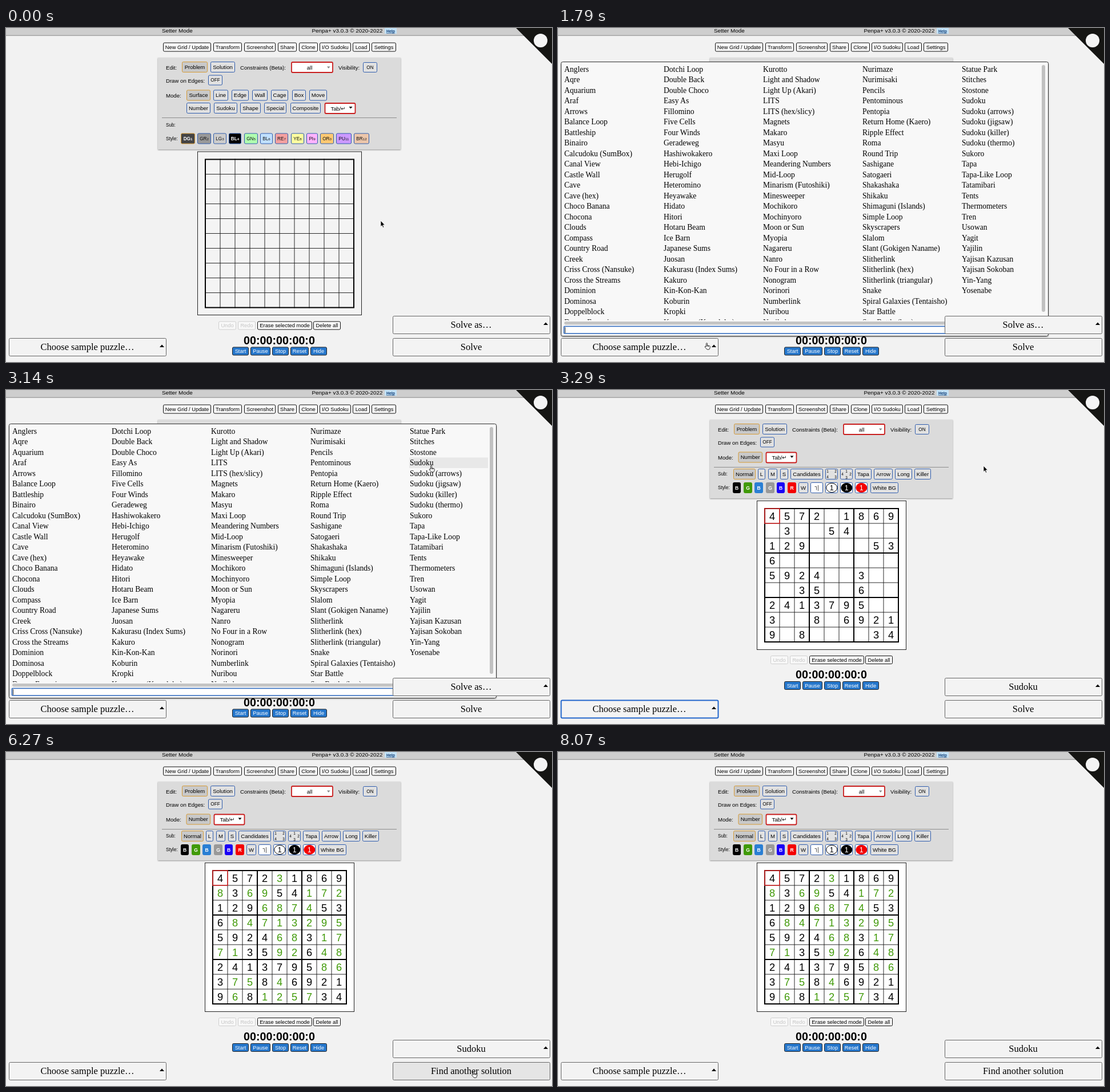
Animation of 956 by 586 pixels, one loop 8.22 s. Source, as an HTML page:

```html
<!DOCTYPE html>
<html lang="en">
<head>
<meta charset="utf-8">
<title>Puzzle solver demo</title>
<style>
html, body { margin: 0; width: 100%; height: 100%; overflow: hidden; background: #f2f2f2; }
svg { display: block; font: 9.6px "Liberation Sans", Arial, "DejaVu Sans", sans-serif; }
.serif { font-family: "Liberation Serif", "Times New Roman", serif; }
.shadow { filter: drop-shadow(0 1px 1px #0006); }
</style>
</head>
<body>
<svg id="stage" width="956" height="586" viewBox="0 0 956 586"></svg>
<script>
const BLUE = '#2f5cad', ORANGE = '#d59a35', RED = '#c81e1e';

const text = (x, y, s, attrs = '') => `<text x="${x}" y="${y}" ${attrs}>${s}</text>`;
const mid = (x, y, s, attrs = '') => text(x, y, s, 'text-anchor="middle" ' + attrs);
const path = (d, attrs = '') => `<path d="${d}" ${attrs}/>`;
const fillRect = (x, y, w, h, fill, attrs = '') =>
  `<rect x="${x}" y="${y}" width="${w}" height="${h}" fill="${fill}" ${attrs}/>`;
// Outlined box whose one-pixel border lies inside x1..x2, y1..y2
const box = (x1, y1, x2, y2, fill, stroke, attrs = 'rx="2"') =>
  fillRect(x1 + .5, y1 + .5, x2 - x1 - 1, y2 - y1 - 1, fill, `stroke="${stroke}" ${attrs}`);
const group = (content, attrs = '') => `<g ${attrs}>${content}</g>`;

function button(x1, x2, y, label, { h = 19, fill = '#e1e1e1', stroke = BLUE, color = '#000', size = 9.6, attrs = '' } = {}) {
  return box(x1, y, x2, y + h, fill, stroke) +
    mid((x1 + x2) / 2, y + h / 2 + size * .36, label, `font-size="${size}" fill="${color}" ${attrs}`);
}
// items: [left, right, label, options]
const row = (y, items, common = {}) =>
  items.map(([a, b, s, o]) => button(a, b, y, s, { ...common, ...o })).join('');
const picked = { fill: '#c9c9c9', stroke: ORANGE };

const redSelect = (x1, x2, y, label, labelX, arrow, arrowColor) =>
  fillRect(x1 + 1, y + 1, x2 - x1 - 2, 18, '#fff', `rx="2" stroke="${RED}" stroke-width="1.8"`) +
  mid(labelX, y + 13.8, label) + path(arrow, `fill="${arrowColor}"`);
const tabSelect = (x, y) =>
  redSelect(x, x + 55, y, 'Tab/↵', x + 24, `M${x + 43} ${y + 7}h6l-3 3.4z`, '#000');

function header() {
  return fillRect(0, 0, 956, 12.5, '#cecece') + fillRect(0, 12.5, 956, 1.2, '#8e8e8e') +
    text(273, 8.3, 'Setter Mode', 'font-size="9.9"') +
    text(535.5, 8.3, 'Penpa+ v3.0.3 © 2020-2022', 'font-size="9.9"') +
    fillRect(663, 0, 21, 10, '#c3e2f7') +
    mid(673.5, 7.8, 'Help', 'font-size="7" font-weight="bold" fill="#123f78" text-decoration="underline"') +
    row(25.5, [[275, 359, 'New Grid / Update'], [363, 413, 'Transform'], [417, 472, 'Screenshot'],
      [476, 509, 'Share'], [513, 546, 'Clone'], [549, 604, 'I/O Sudoku'], [607, 637, 'Load'],
      [640, 683, 'Settings']], { h: 16, fill: '#f8f8f8', stroke: '#111', size: 9.3 }) +
    path('M893 0H956V63z', 'fill="#151513"') + '<circle cx="936" cy="22" r="12" fill="#f4f4f4"/>';
}

function panel(bottom, divider) {
  return fillRect(266, 52, 425, bottom - 52, '#dbdbdb', 'class="shadow"') +
    text(280, 72.5, 'Edit:') + text(410, 72.5, 'Constraints (Beta):') + text(582, 72.5, 'Visibility:') +
    text(280, 95.5, 'Draw on Edges:') + text(280, 121.5, 'Mode:') +
    row(59, [[308, 353, 'Problem', picked], [358, 401, 'Solution']]) +
    button(625, 650, 60, 'ON', { size: 8.2, h: 18 }) + button(354, 379, 82.5, 'OFF', { size: 8.2, h: 18 }) +
    redSelect(499, 573, 59, 'all', 531.5, 'M562 67.5h5.6l-2.8 3.4z', '#888') +
    fillRect(273, divider, 411, 1, '#8c8c8c');
}

function footer(dy) {
  const small = { h: 15, fill: '#f8f8f8', stroke: '#111', size: 9.3 };
  const off = { stroke: '#cfcfcf', color: '#c6c6c6' };
  return group(
    row(514.5, [[372, 403, 'Undo', off], [406, 437, 'Redo', off], [440, 536, 'Erase selected mode'],
      [538, 586, 'Delete all']], small) +
    mid(478.5, 554.5, '00:00:00:00:0', 'font-size="19.7" font-weight="bold"') +
    row(559.5, [[396, 425, 'Start'], [428, 463, 'Pause'], [466, 495, 'Stop'], [498, 530, 'Reset'],
      [533, 562, 'Hide']], { ...small, fill: '#2677cc', stroke: '#222', color: '#fff' }),
    `transform="translate(0 ${dy})"`);
}

// Square grid of 26-pixel cells; every line divisible by `block` is heavy
function grid(x, y, n, block) {
  let thin = '', thick = '';
  for (let i = 0; i <= n; i++) {
    const d = `M${x + 26 * i} ${y - 1}v${26 * n + 2}M${x - 1} ${y + 26 * i}h${26 * n + 2}`;
    if (i % block) thin += d; else thick += d;
  }
  return path(thin, 'stroke="#111" stroke-width=".9"') + path(thick, 'stroke="#000" stroke-width="2"');
}

function startPage() {
  const swatches = [[306, 331, 'DG', 1, '#444'], [335, 359, 'GR', 2, '#999'], [363, 386, 'LG', 3, '#ccc'],
    [390, 412, 'BL', 4, '#000'], [417, 441, 'GN', 5, '#b0ffb0'], [445, 467, 'BL', 6, '#c0e0ff'],
    [471, 494, 'RE', 7, '#f4a0a0'], [499, 522, 'YE', 8, '#ffffa0'], [526, 546, 'PI', 9, '#ffb3ff'],
    [550, 574, 'OR', 0, '#ffc972'], [578, 605, 'PU', 11, '#cc99ff'], [609, 636, 'BR', 12, '#ecc6ab']];
  const isDark = i => i == 0 || i == 3;
  return panel(213, 157) +
    row(108.5, [[316, 358, 'Surface', picked], [363, 389, 'Line'], [395, 425, 'Edge'], [431, 458, 'Wall'],
      [464, 494, 'Cage'], [501, 525, 'Box'], [531, 562, 'Move']]) +
    row(131, [[316, 358, 'Number'], [364, 405, 'Sudoku'], [410, 446, 'Shape'], [452, 491, 'Special'],
      [498, 551, 'Composite']]) +
    tabSelect(557.5, 131) +
    text(280, 172.5, 'Sub:', 'font-size="8.2"') + text(280, 196.5, 'Style:', 'font-size="8.2"') +
    row(184.5, swatches.map(([a, b, s, n, fill], i) => [a, b, `${s}<tspan font-size="6.2">${n}</tspan>`, {
      fill, stroke: i ? BLUE : ORANGE, size: 8.2, color: isDark(i) ? '#fff' : '#111',
      attrs: isDark(i) ? 'font-weight="bold"' : '' }])) +
    box(335, 216.5, 623, 504, '#f4f4f4', '#222', '') + grid(349, 230.5, 10, 10) + footer(0);
}

const solution = ['457231869', '836954172', '129687453', '684713295', '592468317',
  '713592648', '241379586', '375846921', '968125734'];
const givens = ['4572.1869', '.3..54...', '129....53', '6........', '5924..3..',
  '..35..6..', '2413795..', '3..8.6921', '9.8....34'];

function digits(isShown, color) {
  let out = '';
  solution.forEach((line, r) => [...line].forEach((d, c) => {
    if (isShown(givens[r][c])) out += mid(375 + 26 * c, 227.7 + 26 * r, d);
  }));
  return group(out, `font-size="18.2" fill="${color}"`);
}

function sudokuPage() {
  const ink = fill => ({ fill, stroke: fill, color: '#fff', size: 8.6, attrs: 'font-weight="bold"' });
  const tiny = (x, y, s) => mid(x, y, s, 'font-size="6.5"');
  const disc = (x, fill, color) =>
    `<ellipse cx="${x}" cy="171.5" rx="9.5" ry="8" fill="${fill}" stroke="${fill == '#fff' ? '#000' : fill}"/>` +
    mid(x, 176, 1, `font-size="12.5" fill="${color}"`);
  const white = { fill: '#fff' };
  return panel(190, 135) +
    button(315.5, 358, 108.5, 'Number', picked) + tabSelect(363.5, 108.5) +
    text(280, 150, 'Sub:', 'font-size="8.2"') + text(280, 174, 'Style:', 'font-size="8.2"') +
    row(138, [[307, 346, 'Normal', picked], [350, 363, 'L'], [368, 384, 'M'], [389, 403, 'S'],
      [407, 464, 'Candidates'], [468, 490, ''], [494, 516, ''], [520, 549, 'Tapa'], [553, 586, 'Arrow'],
      [590, 620, 'Long'], [624, 653, 'Killer']]) +
    tiny(472, 145, 1) + tiny(486, 145, 2) + tiny(472, 155, 4) + tiny(486, 155, 3) +
    tiny(505, 144.5, 1) + tiny(498, 150, 4) + tiny(512, 150, 2) + tiny(505, 155.5, 3) +
    row(162, [[306, 320, 'B', ink('#000')], [325, 340, 'G', ink('#409a08')], [344, 359, 'B', ink('#2a7fd4')],
      [364, 379, 'G', ink('#999')], [383, 397, 'B', ink('#1a00f5')], [402, 417, 'R', ink('#f40000')],
      [421, 438, 'W'], [442, 464, '', white], [468, 490, '', white], [494, 516, '', white],
      [520, 542, '', white], [547, 596, 'White BG']]) +
    path('M449.5 169.5h3v6M455.5 167v10', 'fill="none" stroke="#555"') +
    disc(479.3, '#fff', '#000') + disc(505.3, '#000', '#fff') + disc(531.3, '#f40000', '#fff') +
    box(348, 194, 610, 456, '#fff', '#222', '') + grid(362, 208, 9, 3) +
    fillRect(362, 208, 26, 26, 'none', 'stroke="#d82020" stroke-width="1.5"') +
    digits(g => g != '.', '#000') + footer(-48.5);
}

const puzzles = [
  'Anglers,Aqre,Aquarium,Araf,Arrows,Balance Loop,Battleship,Binairo,Calcudoku (SumBox),Canal View,Castle Wall,Cave,Cave (hex),Choco Banana,Chocona,Clouds,Compass,Country Road,Creek,Criss Cross (Nansuke),Cross the Streams,Dominion,Dominosa,Doppelblock,Dosun-Fuwari',
  'Dotchi Loop,Double Back,Double Choco,Easy As,Fillomino,Five Cells,Four Winds,Geradeweg,Hashiwokakero,Hebi-Ichigo,Herugolf,Heteromino,Heyawake,Hidato,Hitori,Hotaru Beam,Ice Barn,Japanese Sums,Juosan,Kakurasu (Index Sums),Kakuro,Kin-Kon-Kan,Koburin,Kropki,Kuromasu (Kurodoko)',
  'Kurotto,Light and Shadow,Light Up (Akari),LITS,LITS (hex/slicy),Magnets,Makaro,Masyu,Maxi Loop,Meandering Numbers,Mid-Loop,Minarism (Futoshiki),Minesweeper,Mochikoro,Mochinyoro,Moon or Sun,Myopia,Nagareru,Nanro,No Four in a Row,Nonogram,Norinori,Numberlink,Nuribou,Nurikabe',
  'Nurimaze,Nurimisaki,Pencils,Pentominous,Pentopia,Return Home (Kaero),Ripple Effect,Roma,Round Trip,Sashigane,Satogaeri,Shakashaka,Shikaku,Shimaguni (Islands),Simple Loop,Skyscrapers,Slalom,Slant (Gokigen Naname),Slitherlink,Slitherlink (hex),Slitherlink (triangular),Snake,Spiral Galaxies (Tentaisho),Star Battle,Star Battle (hex)',
  'Statue Park,Stitches,Stostone,Sudoku,Sudoku (arrows),Sudoku (jigsaw),Sudoku (killer),Sudoku (thermo),Sukoro,Tapa,Tapa-Like Loop,Tatamibari,Tents,Thermometers,Tren,Usowan,Yagit,Yajilin,Yajisan Kazusan,Yajisan Sokoban,Yin-Yang,Yosenabe',
].map(list => list.split(','));
const COL = 174, ROW = 18.5;

function menu() {
  const items = puzzles.map((list, c) =>
    list.map((name, r) => text(11 + COL * c, 76.8 + ROW * r, name)).join('')).join('');
  return '<clipPath id="list"><path d="M6 60H845V512.5H6z"/></clipPath>' +
    box(5, 59, 859, 541, '#f8f8f8', '#333', 'rx="3" class="shadow"') +
    fillRect(0, 0, 0, 18.5, '#e8e8e8', 'id="hover"') +
    group(items, 'class="serif" font-size="13.6" clip-path="url(#list)"') +
    fillRect(847, 65, 6, 433, '#c1c1c1', 'rx="3"') + fillRect(11, 515, 830, 5.5, '#c4c4c4', 'rx="2.7"') +
    fillRect(10.5, 523.5, 842, 12.5, '#fff', 'rx="1" stroke="#2a66bd" stroke-width="1.6"') +
    fillRect(12, 525, 1, 10, '#333');
}

const bigButton = (x, y, id, arrow) =>
  box(x, y, x + 276, y + 32, '#f3f3f3', '#666', `rx="2" id="${id}Box"`) +
  mid(x + 137.5, y + 20.8, '', `id="${id}" class="serif" font-size="16.5"`) +
  (arrow ? path(`M${x + 264} ${y + 16}h8l-4-4.5z`) : '');

document.getElementById('stage').innerHTML =
  header() + group(startPage(), 'id="start"') + group(sudokuPage() +
    group(digits(g => g == '.', '#409a08'), 'id="solved"'), 'id="sudoku"') +
  group(menu(), 'id="menu"') +
  bigButton(5, 544, 'choose', true) + bigButton(677, 505, 'kind', true) + bigButton(677, 544, 'solve') +
  path('M0 0V10.5l2.4-2.1 1.7 3.9 1.7-.7-1.7-3.8H7.4z', 'id="arrow" stroke="#fff" stroke-width=".8"') +
  path('M3 7V1.3q1-1.5 2 0V5l4 .9q1 .3.9 1.5L9.2 10q-.3 2-1.5 2H4.6L1 8.1q-.8-1.3.4-1.7zM5 5v2M7 5.6v1.8',
    'id="hand" fill="#fff" stroke="#111" stroke-width=".9"');

const $ = id => document.getElementById(id);
const show = (id, on) => $(id).setAttribute('display', on ? 'inline' : 'none');
const set = (id, attrs) => { for (const k in attrs) $(id).setAttribute(k, attrs[k]); };

// The pointer is sampled about every 147 ms
const step = (t, start) => Math.floor((t - start) / 147) + 1;
const glide = (a, b, p) => {
  p = Math.min(1, Math.max(0, p));
  const e = p * p * (3 - 2 * p);
  return a.map((v, i) => v + (b[i] - v) * e);
};
const approach = [[656, 338], [557, 397], [370, 465], [280, 517], [258, 546], [256.5, 552]];

function pointer(t) {
  if (t < 1790) return approach[t < 900 ? 0 : Math.min(5, step(t, 900))];
  if (t < 3290) return glide([256.5, 552], [740.5, 132], Math.floor((t - 1790) / 150) / 9);
  if (t < 7920) return t < 3730 ? [745, 133] : glide([745, 133], [815, 559.5], step(t, 3730) / 7);
  return t < 8070 ? [850, 573] : null;
}

$('choose').textContent = 'Choose sample puzzle…';

function render(t) {
  const inMenu = t >= 1790 && t < 3290, loaded = t >= 3290, solved = t >= 6270;
  show('start', !loaded);
  show('sudoku', loaded);
  show('menu', inMenu);
  show('solved', solved);
  $('kind').textContent = loaded ? 'Sudoku' : 'Solve as…';
  $('solve').textContent = solved ? 'Find another solution' : t >= 5220 ? 'Solving…' : 'Solve';
  const focus = loaded && t < 5070;
  set('chooseBox', { stroke: focus ? '#2266cc' : '#666', 'stroke-width': focus ? 2 : 1 });

  const at = pointer(t);
  const [x, y] = at || [0, 0];
  const isHand = inMenu || (y > 504 && (x < 280 || x > 677));
  show('arrow', at && !isHand);
  show('hand', at && isHand);
  set(isHand ? 'hand' : 'arrow', { transform: `translate(${x} ${y})` });
  set('solveBox', { fill: x > 677 && y > 540 ? '#e5e5e5' : '#f3f3f3' });

  const c = Math.floor((x - 7) / COL), r = Math.floor((y - 63) / ROW);
  const hit = inMenu && r < 24 && puzzles[c] && puzzles[c][r];
  show('hover', hit);
  if (hit) set('hover', { x: 10 + COL * c, y: 63 + ROW * r, width: c == 4 ? 138 : 165 });
}

function frame() {
  render(performance.now() % 8220);
  requestAnimationFrame(frame);
}
frame();
</script>
</body>
</html>
```
